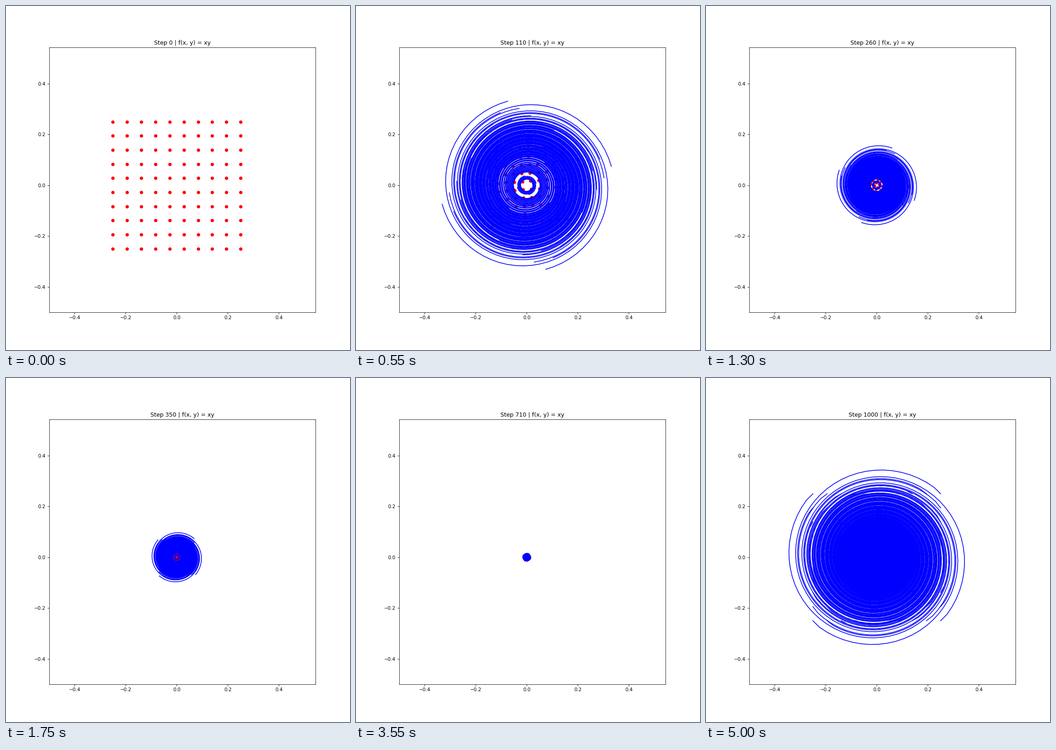
Animation, 748 px wide and 748 px high, one loop 5050 ms. Source, as a matplotlib script:

```python
import numpy as np
import matplotlib.pyplot as plt
from matplotlib.animation import FuncAnimation

ETA = 0.1        # step size of the optimistic gradient method
STEPS = 1000
STRIDE = 10      # steps per frame
TAIL = 100       # steps of history kept visible


def simulate():
    """Optimistic descent-ascent on f(x, y) = xy, with z = x + iy."""
    side = np.linspace(-0.25, 0.25, 10)
    x, y = np.meshgrid(side, side)
    path = np.empty((STEPS + 1, x.size), complex)
    path[0] = (x + 1j * y).ravel()
    prev = path[0]
    for t in range(STEPS):
        path[t + 1] = path[t] + 1j * ETA * (2 * path[t] - prev)
        prev = path[t]
    return path


path = simulate()
top = path.real.max() + 0.2

fig, ax = plt.subplots(figsize=(10, 10), dpi=74.8)
ax.set_xlim(-0.5, top)
ax.set_ylim(-0.5, top)
title = ax.set_title("")
dots = ax.scatter(path[0].real, path[0].imag, s=36, color="red")
trails = [ax.plot([], [], color="blue", lw=1.5)[0] for _ in path[0]]


def update(frame):
    step = frame * STRIDE
    # the last frame reveals the complete paths
    start = 0 if step == STEPS else max(0, step - TAIL)
    part = path[start:step + 1]
    for trail, z in zip(trails, part.T):
        trail.set_data(z.real, z.imag)
    dots.set_offsets(np.column_stack([path[step].real, path[step].imag]))
    title.set_text(f"Step {step} | f(x, y) = xy")
    return [*trails, dots, title]


anim = FuncAnimation(fig, update, frames=STEPS // STRIDE + 1, interval=50,
                     init_func=lambda: update(0), repeat=True,
                     repeat_delay=0, blit=False)
plt.show()
```
